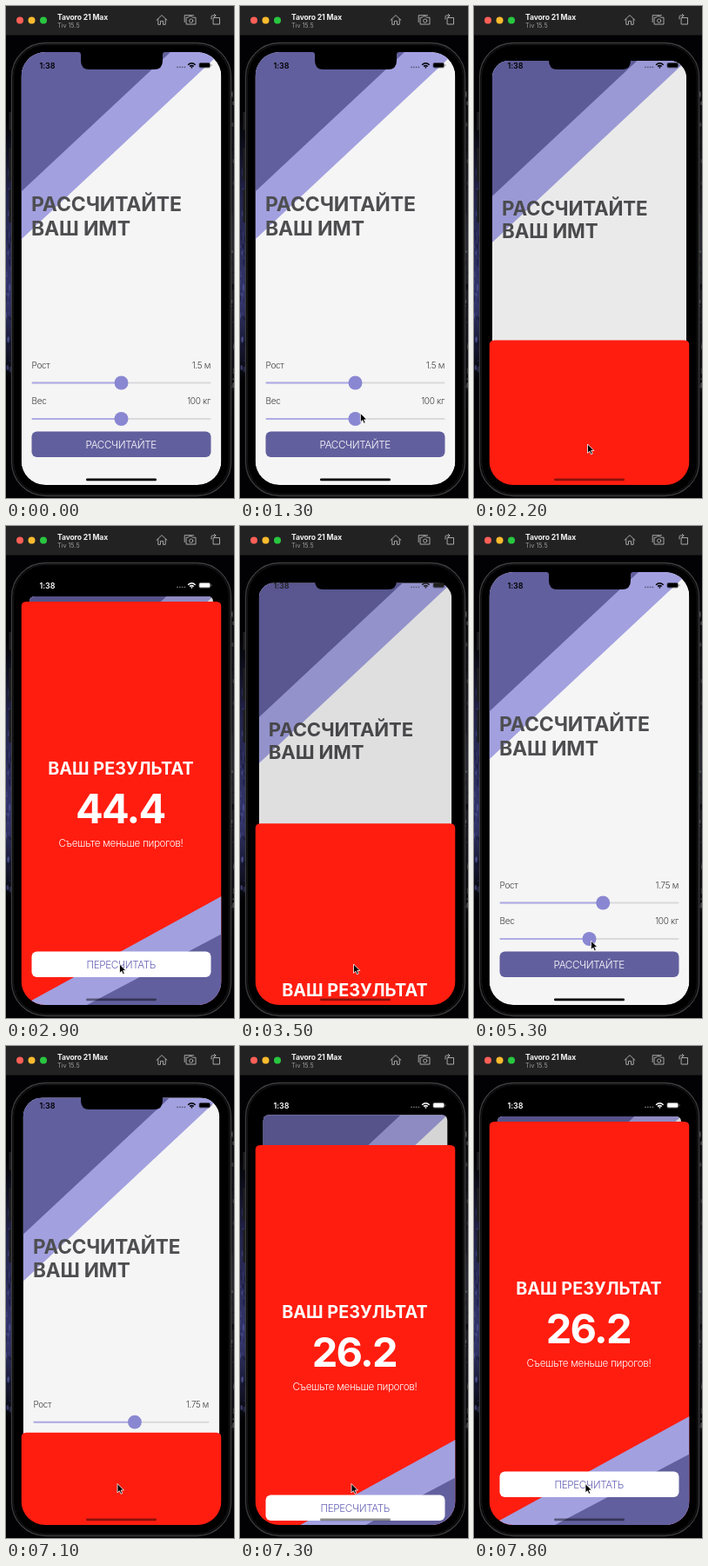
Write an HTML page that moves like this. It is 262x566 px and loops after 8000 ms.

```html
<!DOCTYPE html>
<html lang="ru">
<head>
<meta charset="utf-8">
<title>ИМТ</title>
<style>
  html, body { margin: 0; width: 100%; height: 100%; overflow: hidden; background: #000; }
  svg { display: block; width: 262px; height: 566px; font-family: Inter, Roboto, sans-serif; }
  .title { font-weight: 700; font-size: 23px; letter-spacing: -.15px; fill: #4e4e51; }
  .label { font-weight: 300; font-size: 10px; letter-spacing: -.3px; fill: #3f3f42; }
  .button { font-weight: 300; font-size: 11.7px; letter-spacing: -.4px; text-anchor: middle; }
  .end { text-anchor: end; }
  .mid { text-anchor: middle; }
  .icon { fill: none; stroke: #a6a6a6; stroke-width: 1; stroke-linejoin: round; stroke-linecap: round; }
</style>
</head>
<body>
<svg viewBox="0 0 262 566">
  <defs>
    <clipPath id="screen"><rect x="17.5" y="53" width="230" height="498" rx="27.7"/></clipPath>
    <clipPath id="card"><rect id="cardShape" x="17.5" y="53" width="230" height="498"/></clipPath>
    <linearGradient id="earth" x2="0" y2="1">
      <stop offset="0" stop-color="#020204"/>
      <stop offset=".3" stop-color="#23244c"/>
      <stop offset=".7" stop-color="#34366e"/>
      <stop offset="1" stop-color="#020204"/>
    </linearGradient>
    <linearGradient id="coast" x2="0" y2="1">
      <stop offset="0" stop-color="#020204"/>
      <stop offset=".5" stop-color="#2b2c33"/>
      <stop offset="1" stop-color="#020204"/>
    </linearGradient>
  </defs>

  <rect width="262" height="566" fill="#020204"/>
  <rect y="130" width="8" height="300" fill="url(#earth)"/>
  <rect x="256" y="60" width="6" height="420" fill="url(#coast)"/>
  <g id="flecks"></g>

  <rect width="262" height="33.5" fill="#222223"/>
  <circle cx="16" cy="16.5" r="4" fill="#fe5f57"/>
  <circle cx="29.5" cy="16.5" r="4" fill="#febb2e"/>
  <circle cx="43" cy="16.5" r="4" fill="#29c73f"/>
  <text x="59" y="15.8" font-size="8.6" font-weight="700" letter-spacing="-.15" fill="#f2f2f2">Tavoro 21 Max</text>
  <text x="59" y="24.6" font-size="7.2" fill="#9c9c9d">Tiv 15.5</text>
  <g class="icon">
    <path d="M173 16.3 179 10.6 185 16.3M174.8 15V21.3H177.5V17.3H180.5V21.3H183.2V15"/>
    <path d="M207.5 13.2H209.5L210.5 11.8H213.5L214.5 13.2H218V21H207.5ZM205.2 18.5V10.7H215.5"/>
    <circle cx="212.7" cy="17" r="2.1"/>
    <path d="M238.5 13.5H245.5V21H238.5ZM236 15V12.2Q236 11 237.3 11H241M239.3 9.3 241 11 239.3 12.7"/>
  </g>

  <g fill="#1c1c1e">
    <rect x="3.5" y="122" width="4" height="21" rx="1"/>
    <rect x="3.5" y="163" width="4" height="38" rx="1"/>
    <rect x="3.5" y="211" width="4" height="38" rx="1"/>
    <rect x="257" y="179" width="3.5" height="60" rx="1"/>
  </g>
  <rect x="6.5" y="42.5" width="252" height="521" rx="39" fill="#050505" stroke="#3d3d3f" stroke-width="1.3"/>
  <rect x="8.6" y="44.6" width="247.8" height="516.8" rx="37" fill="#000" stroke="#171718"/>

  <g clip-path="url(#screen)">
    <g id="main" clip-path="url(#card)">
      <rect x="17.5" y="53" width="230" height="498" fill="#f5f5f5"/>
      <path d="M17.5 53H247.5L17.5 268.5Z" fill="#a2a0df"/>
      <path d="M17.5 53H189L17.5 213.5Z" fill="#625f9e"/>
      <text class="title" x="29" y="236">РАССЧИТАЙТЕ</text>
      <text class="title" x="29" y="263.6">ВАШ ИМТ</text>
      <text class="label" x="29.5" y="416.6">Рост</text>
      <text class="label end" id="heightText" x="235" y="416.6"></text>
      <text class="label" x="29.5" y="458">Вес</text>
      <text class="label end" id="weightText" x="235" y="458"></text>
      <g id="sliders"></g>
      <rect x="29.5" y="489.5" width="206" height="29.5" rx="6" fill="#625f9e"/>
      <text class="button" id="goText" x="132.2" y="508.7" fill="#fff">РАССЧИТАЙТЕ</text>
      <rect id="dim" x="17.5" y="53" width="230" height="498"/>
    </g>
    <g id="sheet">
      <path d="M17.5 551V93Q17.5 87 23.5 87H241.5Q247.5 87 247.5 93V551Z" fill="#ff1d10"/>
      <path d="M247.5 426V551H20Z" fill="#a2a0df"/>
      <path d="M247.5 469.5V551H93Z" fill="#625f9e"/>
      <text class="mid" x="132" y="286.2" font-size="19.8" font-weight="700" fill="#fff">ВАШ РЕЗУЛЬТАТ</text>
      <text class="mid" id="result" x="131.3" y="341.5" font-size="47" font-weight="700" letter-spacing="-1.7" fill="#fff"></text>
      <text class="mid" x="132" y="368.6" font-size="11.7" font-weight="300" letter-spacing="-.35" fill="#fff">Съешьте меньше пирогов!</text>
      <rect x="29.5" y="489.5" width="206" height="29.5" rx="6" fill="#fff"/>
      <text class="button" id="backText" x="132.2" y="508.7" fill="#625fb4">ПЕРЕСЧИТАТЬ</text>
    </g>
  </g>
  <path d="M83 52V53Q86 53 86 56V63Q86 73 96 73H170Q180 73 180 63V56Q180 53 183 53V52Z" fill="#000"/>

  <g id="status">
    <text x="38.6" y="71.6" font-size="9" font-weight="600" letter-spacing="-.1">1:38</text>
    <g opacity=".45">
      <circle cx="197" cy="70.3" r=".9"/><circle cx="199.8" cy="70.3" r=".9"/>
      <circle cx="202.6" cy="70.3" r=".9"/><circle cx="205.4" cy="70.3" r=".9"/>
    </g>
    <path d="M208.6 67.2Q213.4 62.6 218.2 67.2L217.1 68.3Q213.4 64.9 209.7 68.3ZM210.5 69Q213.4 66.5 216.3 69L215.2 70.1Q213.4 68.7 211.6 70.1ZM212.1 70.6Q213.4 69.7 214.7 70.6L213.4 71.9Z"/>
    <rect x="221.5" y="65" width="13.5" height="6.4" rx="2" opacity=".4"/>
    <rect x="222.3" y="65.8" width="11.9" height="4.8" rx="1.3"/>
    <rect x="235.5" y="67.2" width=".9" height="2" rx=".4" opacity=".5"/>
  </g>
  <rect id="home" x="92" y="543.6" width="81" height="2.7" rx="1.35"/>
  <path id="cursor" d="M0 0V10.4L2.4 8.2 4 11.8 5.8 11 4.2 7.5H7.4Z" fill="#000" stroke="#fff" stroke-width=".8" stroke-linejoin="round"/>
</svg>
<script>
const LOOP = 8000;
const SHEET_TRAVEL = 464;
const $ = id => document.getElementById(id);
const set = (el, attrs) => { for (const k in attrs) el.setAttribute(k, attrs[k]); };
const clamp = v => Math.min(1, Math.max(0, v));
const smooth = (t, a, b) => { const u = clamp((t - a) / (b - a)); return u * u * (3 - 2 * u); };

function add(parent, tag, attrs) {
  const el = document.createElementNS('http://www.w3.org/2000/svg', tag);
  set(el, attrs);
  return parent.appendChild(el);
}

// Thin strips of wallpaper beside the phone
let seed = 7;
const rand = () => (seed = seed * 16807 % 2147483647) / 2147483647;
for (let i = 0; i < 80; i++) {
  const left = i % 2;
  add($('flecks'), 'ellipse', {
    cx: left ? rand() * 6 : 259 + rand() * 3,
    cy: left ? 150 + rand() * 270 : 70 + rand() * 400,
    rx: .4 + rand(), ry: .5 + rand() * 4,
    fill: (left ? ['#5a5fa6', '#0b0c20'] : ['#6f7470', '#08080a'])[i >> 1 & 1],
    opacity: .2 + rand() * .4
  });
}

function makeSlider(y) {
  const line = { x: 29.5, y: y - 1, height: 2, rx: 1 };
  add($('sliders'), 'rect', { ...line, width: 206, fill: '#dadadc' });
  const fill = add($('sliders'), 'rect', { ...line, fill: '#aeabe6' });
  const knob = add($('sliders'), 'circle', { cy: y, r: 8, fill: '#8a87d2' });
  return ratio => {
    const x = 38 + 189 * ratio;
    set(fill, { width: x - 29.5 });
    set(knob, { cx: x });
  };
}
const setHeight = makeSlider(433.5);
const setWeight = makeSlider(475);

// Critically damped spring
const spring = ms => {
  const x = Math.max(0, ms) * .01826;
  return 1 - (1 + x) * Math.exp(-x);
};
const sheetAt = t =>
  t < 3400 ? spring(t - 2132) :
  t < 7000 ? 1 - spring(t - 3400) : spring(t - 7051.5);

// Pointer moves: start, end, x, y
const moves = [
  [0, 0, 213, 448],
  [430, 600, 145, 448],
  [850, 1050, 144.5, 441],
  [1050, 1600, 130.5, 504],
  [3650, 4200, 135, 434],
  [4500, 5000, 150, 434],
  [5020, 5300, 134.5, 477],
  [5400, 6250, 113, 476],
  [6500, 6900, 128, 503.5]
];
function pointerAt(t) {
  let [, , x, y] = moves[0];
  for (const [a, b, tx, ty] of moves.slice(1)) {
    const k = smooth(t, a, b);
    x += (tx - x) * k;
    y += (ty - y) * k;
  }
  return [x, y];
}

// Button text dims while held, then fades back
const pressed = (t, down, up) => t < down ? 1 : t < up ? .25 : .25 + .75 * clamp((t - up) / 250);

function draw(t) {
  const p = sheetAt(t);
  const height = 1.5 + .25 * smooth(t, 4500, 5000);
  const weight = 100 - 20 * smooth(t, 5400, 6250);

  setHeight(height / 3);
  setWeight(weight / 200);
  $('heightText').textContent = (height === 1.5 ? '1.5' : height.toFixed(2)) + ' м';
  $('weightText').textContent = Math.round(weight) + ' кг';
  $('result').textContent = t < 7000 ? '44.4' : '26.2';

  const s = 1 - .083 * p;
  set($('main'), { transform: `translate(132.5 ${302 + 7.3 * p}) scale(${s}) translate(-132.5 -302)` });
  set($('cardShape'), { rx: 27.7 - 21.7 * p });
  set($('dim'), { opacity: .13 * smooth(p, .2, .6) });
  set($('sheet'), { transform: `translate(0 ${SHEET_TRAVEL * (1 - p)})` });

  const c = Math.round(255 * clamp((p - .4) / .4));
  set($('status'), { fill: `rgb(${c},${c},${c})` });
  set($('home'), { opacity: 1 - .55 * clamp(p * 5) });
  set($('goText'), { opacity: Math.min(pressed(t, 1900, 2100), t < 6000 ? 1 : pressed(t, 6950, 7040)) });
  set($('backText'), { opacity: t < 7000 ? pressed(t, 3300, 3390) : 1 });

  const [x, y] = pointerAt(t);
  set($('cursor'), { transform: `translate(${x} ${y})`, opacity: t < 200 ? 0 : 1 });
}

const start = performance.now();
function frame() {
  draw((performance.now() - start) % LOOP);
  requestAnimationFrame(frame);
}
frame();
</script>
</body>
</html>
```
